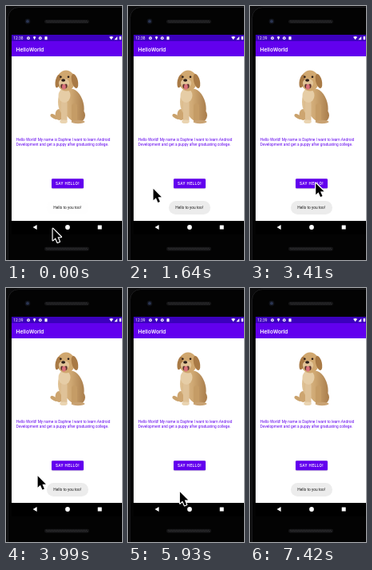
These frames come from a looping animation (145x318 px, 8.63 s). An HTML page with a canvas:

```html
<!DOCTYPE html>
<html lang="en">
<head>
<meta charset="utf-8">
<title>HelloWorld</title>
<style>
  html, body { margin: 0; width: 100%; height: 100%; overflow: hidden; background: #000; }
  canvas { display: block; width: 100vw; height: 100vh; }
</style>
</head>
<body>
<canvas></canvas>
<script>
const W = 145, H = 318, LOOP = 8630;
const PURPLE = '#6200ee', DARK_PURPLE = '#3c00bd';
const canvas = document.querySelector('canvas');
const c = canvas.getContext('2d');
let scale = 1;

const stepAt = t => Math.floor((t + 17) / 148.4);
const clamp = v => Math.min(1, Math.max(0, v));
const ease = u => u * u * (3 - 2 * u);

// Pointer glides; bow bends the path sideways.
const home = { x: 58, y: 278 };
const glides = [
  { from: 1, to: 6, x: 62, y: 212, bow: -8 },
  { from: 7, to: 11, x: 31, y: 228 },
  { from: 13, to: 15, x: 69.5, y: 219.5 },
  { from: 22, to: 27, x: 39, y: 234.5, bow: 26 },
  { from: 30, to: 35, x: 40, y: 278.3 },
  { from: 35, to: 37, x: 59, y: 271 },
  { from: 38, to: 43, x: 74, y: 223.5 },
  { from: 45, to: 48, x: 50, y: 296.5 }
];
const POINTER_GONE = 50;

function pointerAt(s) {
  let { x, y } = home;
  for (const g of glides) {
    const u = clamp((s - g.from) / (g.to - g.from)), e = ease(u);
    x += (g.x - x) * e + (g.bow || 0) * Math.sin(Math.PI * u);
    y += (g.y - y) * e;
  }
  return [x, y];
}

const press = (s, start) => s < start ? 0 : clamp(1 - (s - start) / 2);
const glowAt = s => Math.max(press(s, 18), press(s, 44));
const toastAt = s => clamp(Math.max((36 - s) / 2.2, (s - 45) / 2));

function box(x, y, w, h, fill, r = 0) {
  c.fillStyle = fill;
  c.beginPath();
  c.roundRect(x, y, w, h, r);
  c.fill();
}

function oval(x, y, rx, ry, fill, turn = 0) {
  c.fillStyle = fill;
  c.beginPath();
  c.ellipse(x, y, rx, ry, turn, 0, Math.PI * 2);
  c.fill();
}

function poly(points, fill) {
  c.fillStyle = fill;
  c.beginPath();
  points.forEach(p => c.lineTo(...p));
  c.closePath();
  c.fill();
}

function ring(x, y, r) {
  oval(x, y, r, r, '#fff');
  oval(x, y, r * 0.4, r * 0.4, DARK_PURPLE);
}

function text(str, x, y, size, color, weight = 400, spacing = 0) {
  c.font = `${weight} ${size}px Roboto, sans-serif`;
  c.letterSpacing = spacing + 'px';
  c.fillStyle = color;
  c.fillText(str, x, y);
}

function grille(y) {
  box(48, y, 56, 4.6, '#161618', 2.3);
  for (let i = 0; i < 52; i++) box(50 + i, y + 1 + (i % 2) * 1.5, 1, 1, '#38383a');
}

function drawPhone() {
  box(0, 0, W, H, '#0c0c0d');
  box(2, 1, 180, 336, '#030303', 14);
  c.strokeStyle = '#2c2c2e';
  c.lineWidth = 0.7;
  c.beginPath();
  c.roundRect(2.6, 1.6, 180, 335, 13);
  c.stroke();
  oval(27, 19.2, 3.4, 3.4, '#101219');
  oval(27, 19.2, 1.9, 1.9, '#2a3552');
  grille(17.2);
  grille(301.8);
}

function drawScreen(s) {
  box(7, 36, 138, 233, '#fff');
  box(7, 36, 138, 8.2, DARK_PURPLE);
  text(s < 14 ? '12:38' : '12:39', 9.3, 42.2, 4.9, '#fff');
  ring(28, 40.2, 1.9);
  poly([[33.8, 38.8], [35.6, 38], [37.4, 38.8], [35.6, 42.4]], '#fff');
  ring(42.8, 40.2, 1.9);
  box(48.4, 38.2, 3.2, 4, '#fff', 0.5);
  poly([[129, 38.8], [131.6, 38], [134.2, 38.8], [131.6, 42.2]], '#fff');
  poly([[139.2, 42.2], [139.2, 38], [135.4, 42.2]], '#fff');
  box(141.7, 38, 2.4, 4.2, '#fff', 0.4);

  box(7, 44, 138, 19, PURPLE);
  text('HelloWorld', 12.5, 56.5, 7.05, '#fff', 500);
  text('Hello World! My name is Daphne I want to learn Android', 12.8, 169.2, 4.77, PURPLE);
  text('Development and get a puppy after graduating college.', 12.8, 175, 4.77, PURPLE);

  box(7, 269, 138, 17, '#000');
  poly([[33.6, 277], [38.6, 274.1], [38.6, 279.9]], '#fff');
  oval(77, 277, 2.9, 2.9, '#fff');
  box(114.7, 274.5, 5, 5, '#fff', 0.3);
}

function drawPuppy() {
  const fur = c.createLinearGradient(62, 0, 100, 0);
  fur.addColorStop(0, '#e3c79c');
  fur.addColorStop(0.5, '#cfa873');
  fur.addColorStop(1, '#a67a49');
  const ear = '#a97a45', muzzle = '#e2c498', dark = '#2a1c16';
  oval(60, 138.5, 5, 2.4, '#caa26c', 0.5);
  oval(84, 124, 13, 21, fur, -0.25);
  oval(91, 137, 8, 8.5, fur);
  oval(66.5, 136, 5, 7, '#cda570');
  oval(76, 120, 11, 18, fur);
  box(69, 118, 7.5, 28, '#dfc298', 3.7);
  box(82, 122, 7, 24, '#c59c66', 3.5);
  oval(72, 144.8, 4.8, 2.3, '#ead4b1');
  oval(90, 145, 8.5, 2.2, '#c9a272');
  oval(73, 112, 7.5, 9, '#e6cda6');
  oval(75, 93.5, 11.3, 13, '#d0a76f');
  oval(65, 94, 3.2, 8.5, ear, 0.2);
  oval(86, 94, 3.8, 9.2, ear, -0.25);
  oval(72.5, 96.5, 6.6, 5.6, muzzle);
  oval(72.5, 100, 4.2, 3.6, '#5a302b');
  oval(72.4, 101.2, 2.4, 3.4, '#d9717a');
  oval(72.2, 95.6, 5, 2.4, muzzle);
  oval(71.6, 93, 2.5, 1.8, dark);
  oval(68.4, 88.8, 1.3, 1.3, dark);
  oval(78, 88.8, 1.3, 1.3, dark);
}

function drawButton(glow) {
  c.save();
  c.shadowColor = `rgba(0,0,0,${0.22 + glow * 0.2})`;
  c.shadowBlur = (1.2 + glow * 2) * scale;
  c.shadowOffsetY = (0.4 + glow * 0.8) * scale;
  box(57, 216.3, 40, 12, PURPLE, 1.3);
  c.restore();
  box(57, 216.3, 40, 12, `rgba(205,110,255,${glow * 0.38})`, 1.3);
  text('SAY HELLO!', 62, 224.3, 4.8, '#fff', 500, 0.43);
}

function drawToast(s) {
  c.globalAlpha = toastAt(s);
  box(51, 244, 52, 17, s < 2 ? '#fefefe' : '#ececec', 8.5);
  text('Hello to you too!', 59.3, 254.2, 4.8, '#1c1c1c');
  c.globalAlpha = 1;
}

function drawPointer(x, y) {
  c.save();
  c.translate(x, y);
  c.scale(1.06, 1.06);
  c.lineWidth = 2.2;
  c.lineJoin = 'round';
  c.strokeStyle = '#fff';
  poly([[0.6, 0.8], [0.6, 14.4], [3.7, 11.5], [6.1, 17], [8.4, 16], [6.1, 10.6], [10.3, 10.5]], '#000');
  c.stroke();
  c.fill();
  c.restore();
}

function fit() {
  const dpr = devicePixelRatio || 1;
  const w = Math.round(innerWidth * dpr), h = Math.round(innerHeight * dpr);
  if (canvas.width !== w || canvas.height !== h) {
    canvas.width = w;
    canvas.height = h;
  }
  scale = w / W;
  c.setTransform(scale, 0, 0, h / H, 0, 0);
}

function draw(t) {
  const s = stepAt(t);
  fit();
  drawPhone();
  drawScreen(s);
  drawPuppy();
  drawButton(glowAt(s));
  drawToast(s);
  if (s < POINTER_GONE) drawPointer(...pointerAt(s));
}

const start = performance.now();
function tick() {
  draw((performance.now() - start) % LOOP);
  requestAnimationFrame(tick);
}
tick();
</script>
</body>
</html>
```
